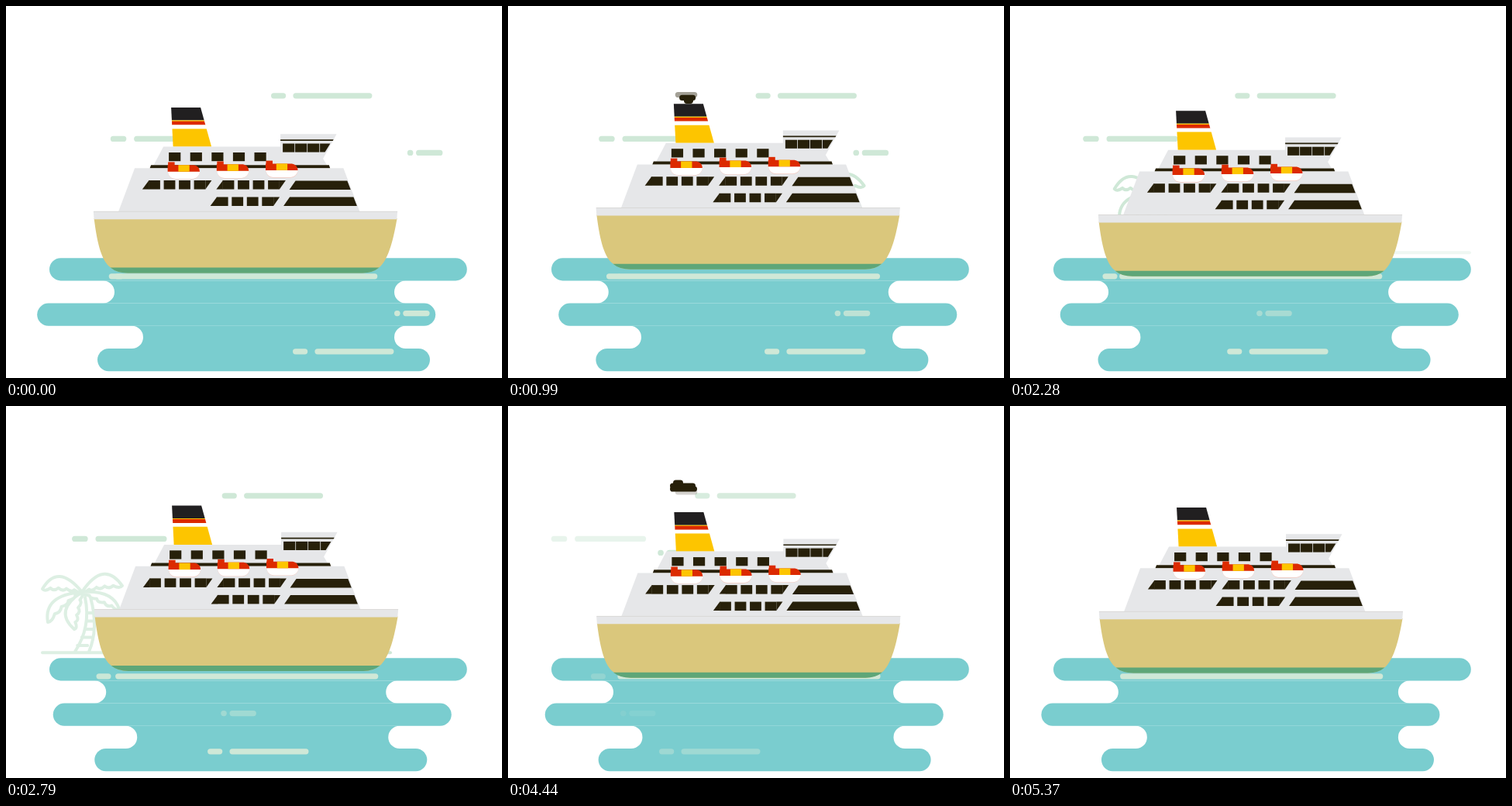
Recreate the animation shown at these times as an HTML page with a canvas. Size 640 by 480 pixels, loop 5.4 s.

```html
<!DOCTYPE html>
<html lang="en">
<head>
<meta charset="utf-8">
<title>Cruise ship</title>
<style>
  html, body { margin: 0; width: 100%; height: 100%; overflow: hidden; background: #fff; }
  canvas { display: block; }
</style>
</head>
<body>
<canvas id="stage" width="640" height="480"></canvas>
<script>
const ctx = document.getElementById('stage').getContext('2d');
const LOOP = 5400, STEP = 30, PUFF_LOOP = 2850;
const SEA = '#7acdcf', MINT = '#cfe8d7', GREY = '#e6e7e9', DARK = '#27200a';
const RED = '#dc2a00', YELLOW = '#fdc500', SAND = '#dac77c', KEEL = '#5ea678';

const ramp = (t, from, to) => Math.max(0, Math.min(1, (t - from) / (to - from)));
const fade = (t, from, to) => 1 - ramp(t, from, to);
const times = (n, draw) => { for (let i = 0; i < n; i++) draw(i); };

// Sideways sway: eases out to its size at the peak, then returns by the loop's end.
function sway(t, peak, size, bend = 0) {
  const arch = (u, k) => u * (1 + k - k * u);
  return size * (t < peak ? arch(t / peak, .5) : arch((LOOP - t) / (LOOP - peak), bend));
}

// The ship bobs between these turning points.
const bobKeys = [[0, 0], [900, -5], [1900, 6.5], [3230, -5.6], [4600, 6.5], [LOOP, 0]];
function bob(t) {
  const i = bobKeys.findIndex(key => key[0] > t);
  const [t0, y0] = bobKeys[i - 1], [t1, y1] = bobKeys[i];
  return y0 + (y1 - y0) * (1 - Math.cos(Math.PI * (t - t0) / (t1 - t0))) / 2;
}
const shipX = t => 1.1 + (2 * t / LOOP - 1) ** 3;

function poly(color, ...p) {
  ctx.fillStyle = color;
  ctx.beginPath();
  for (let i = 0; i < p.length; i += 2) ctx.lineTo(p[i], p[i + 1]);
  ctx.fill();
}
function rect(color, x, y, w, h) {
  ctx.fillStyle = color;
  ctx.fillRect(x, y, w, h);
}
function pill(color, x, y, w, h = 7.2, alpha = 1) {
  ctx.globalAlpha = alpha;
  ctx.fillStyle = color;
  ctx.beginPath();
  ctx.roundRect(x, y, w, h, h / 2);
  ctx.fill();
  ctx.globalAlpha = 1;
}
function shape(color, d) {
  ctx.fillStyle = color;
  ctx.fill(new Path2D(d));
}

// A short and a long dash.
function dashes(x, y, short, long, alpha) {
  pill(MINT, x, y, short, 7.2, alpha);
  pill(MINT, x + short * 1.48, y, long, 7.2, alpha);
}

function clouds(t) {
  dashes(342 - .0227 * t, 112.2, 19.2, 102, fade(t, 4300, 5150));
  dashes(134.8 - .0178 * t, 167.8, 20.5, 92, fade(t, 3950, 4900));
  dashes(517.8 - .0731 * t, 185.8, 7.6, 34.4, fade(t, 4450, 5150));
}

// Leaf from the crown: a smooth outer edge out to the tip, a scalloped edge back.
function frond(tipX, tipY, outX, outY, inX, inY) {
  const X = 98, Y = 240, lobes = 5;
  const along = (u, a, b, c) => (1 - u) ** 2 * a + 2 * u * (1 - u) * b + u * u * c;
  ctx.moveTo(X, Y);
  ctx.quadraticCurveTo(outX, outY, tipX, tipY);
  times(lobes, i => {
    const u = (i + 1) / lobes, mid = (i + .5) / lobes;
    const mx = along(mid, tipX, inX, X), my = along(mid, tipY, inY, Y);
    const push = 5 / Math.hypot(mx - outX, my - outY);
    ctx.quadraticCurveTo(mx + (mx - outX) * push, my + (my - outY) * push,
      along(u, tipX, inX, X), along(u, tipY, inY, Y));
  });
}

function palm() {
  ctx.beginPath();
  frond(47, 236, 67, 202, 73, 232);
  frond(54, 279, 48, 244, 76, 250);
  frond(88, 288, 61, 264, 91, 266);
  frond(150, 232, 126, 198, 120, 230);
  frond(146, 262, 138, 237, 122, 251);
  ctx.moveTo(102, 247);
  ctx.quadraticCurveTo(110, 285, 89, 317);
  ctx.moveTo(109, 247);
  ctx.quadraticCurveTo(120, 287, 107, 317);
  times(5, i => {
    const x = 105 - i * i * .8, y = 267 + i * 10.5;
    ctx.moveTo(x, y);
    ctx.lineTo(x + 9 + i, y);
  });
  ctx.moveTo(47, 318.3);
  ctx.lineTo(150, 318.3);
  ctx.stroke();
}

function coast(t) {
  ctx.save();
  ctx.globalAlpha = ramp(t, 0, 240) * fade(t, 2740, 2910);
  ctx.translate((2790 - t) * .172, 0);
  ctx.strokeStyle = MINT;
  ctx.lineWidth = 4;
  ctx.lineCap = ctx.lineJoin = 'round';
  palm();
  ctx.restore();
  pill(MINT, 392 + (2790 - t) * .19, 316.3, 106, 4, ramp(t, 2220, 2400) * fade(t, 3250, 3450));
}

function sea(t) {
  const H = 29.2, R = H / 2, top = i => 325.2 + H * i;
  const row = (i, x, w) => pill(SEA, x, top(i), w, H);
  // A row whose two ends are bitten inwards.
  const neck = (i, left, right) => {
    const y = top(i) + R, q = Math.PI / 2;
    ctx.fillStyle = SEA;
    ctx.beginPath();
    ctx.arc(left - R, y, R, -q, q);
    ctx.arc(right + R, y, R, q, 3 * q);
    ctx.fill();
  };
  const high = sway(t, 1770, -15), low = sway(t, 2200, -8.7, .5);
  row(0, 56, 538.8);
  neck(1, 140 + high, 501 + high);
  row(2, 40.2 + sway(t, 1425, 31.3), 514);
  neck(3, 177 + low, 501 + low);
  row(4, 118 + sway(t, 1400, -5.7), 429);

  pill(MINT, 140 + shipX(t), 345.2, 339.2);
  pill(MINT, 132.7 - .0058 * t, 345.2, 19, 7.2, fade(t, 2600, 5200));
  dashes(501 - .0802 * t, 393, 7.6, 34.4, fade(t, 0, 5000));
  dashes(370 - .0394 * t, 442.2, 19.2, 102, fade(t, 3500, 5150));
}

// Centre and width of each puff; they appear and vanish from the bottom up.
const puffs = [[233, 12], [231.6, 21], [230, 28.5], [226.5, 35], [225.5, 33], [219.5, 13]];

function smoke(t) {
  const phase = t % PUFF_LOOP, rise = (1770 - phase) * .006;
  puffs.forEach(([x, w], i) => {
    const start = 630 + 150 * i;
    const alpha = ramp(phase, start, start + 140) * fade(phase, start + 540, start + 690);
    pill(DARK, x - w / 2, 114 - 3.9 * i + rise, w, 7.2, alpha);
  });
}

// Four cabin windows, the outer two cut at a slant.
function cabins(x, y) {
  const h = 11.5, end = x + 81.5;
  times(4, i => rect(DARK, x + 8.2 + 19.5 * i, y, 14.8, h));
  poly(DARK, x + 8.5, y, x + 8.5, y + h, x, y + h);
  poly(DARK, end, y, end + 8, y, end, y + h);
}
function longWindow(left, right, y) {
  poly(DARK, left + 8, y, right - 4.5, y, right, y + 11.5, left, y + 11.5);
}

function lifeboat(x, y) {
  const hull = 'h41c-.3 5.7-5 9.5-10 9.5h-21c-6 0-10-4-10-9.5';
  shape('#f3c9c0', `M${x} ${y + 12.6}${hull}`);
  shape('#fff', `M${x} ${y + 12}${hull}`);
  rect(RED, x, y, 8.5, 6);
  shape(RED, `M${x - .5} ${y + 3.8}h34q7 1 7.5 8.5h-41.5z`);
  rect(YELLOW, x + 13.3, y + 3.8, 14.3, 8.5);
}

function funnel() {
  const band = (color, y0, y1) => {
    const left = y => 213 + (y - 131) * .05, right = y => 251 + (y - 131) * .277;
    poly(color, left(y0), y0, right(y0), y0, right(y1), y1, left(y1), y1);
  };
  band('#211f20', 131, 147.6);
  band(YELLOW, 147.6, 149);
  band(RED, 148.7, 153.6);
  band('#fff', 153.6, 158.4);
  band(YELLOW, 158.4, 181.6);
}

function ship(t) {
  ctx.save();
  ctx.translate(shipX(t), bob(t));
  funnel();

  // Bridge and upper deck
  poly(GREY, 203, 181.5, 354, 181.5, 354, 165.3, 426.5, 165.3, 409, 197, 414, 205.3, 190.5, 205.3);
  poly(DARK, 354, 172.3, 422.6, 172.3, 421.6, 174, 354, 174);
  times(3, i => rect(DARK, 357 + 16 * i, 177.5, 15.2, 11.1));
  poly(DARK, 405, 177.5, 418.3, 177.5, 411.5, 188.6, 405, 188.6);
  times(5, i => rect(DARK, 210 + 27.6 * i, 189, 15.2, 11.2));

  // Main deck
  poly(DARK, 187, 205.2, 416.7, 205.2, 418.2, 209.4, 185.4, 209.4);
  poly(GREY, 166, 209.3, 435.3, 209.3, 456.3, 265.2, 145, 265.2);
  cabins(175.8, 225);
  cabins(271.3, 225);
  cabins(263.5, 246.5);
  longWindow(365.5, 444.7, 225.5);
  longWindow(358, 452.8, 246.5);
  times(3, i => lifeboat(209 + 63.2 * i, 201.4 - .9 * i));

  // Hull
  shape(SAND, `M113.5 274C117 302 122 326 133 336Q142 344.6 157 344.6H460
    Q474 344.6 483 336C494 325 500 300 504.5 274Z`);
  shape(KEEL, 'M134.6 337.6H481.4Q473 344.6 460 344.6H157Q143 344.6 134.6 337.6');
  poly(GREY, 112.7, 265, 505, 265, 504.2, 275.2, 113.5, 275.2);
  rect('#d3d2cf', 113, 264.8, 392, .7);
  ctx.restore();
}

function frame() {
  const t = Math.floor(performance.now() % LOOP / STEP) * STEP;
  rect('#fff', 0, 0, 640, 480);
  clouds(t);
  coast(t);
  sea(t);
  smoke(t);
  ship(t);
  requestAnimationFrame(frame);
}
frame();
</script>
</body>
</html>
```
